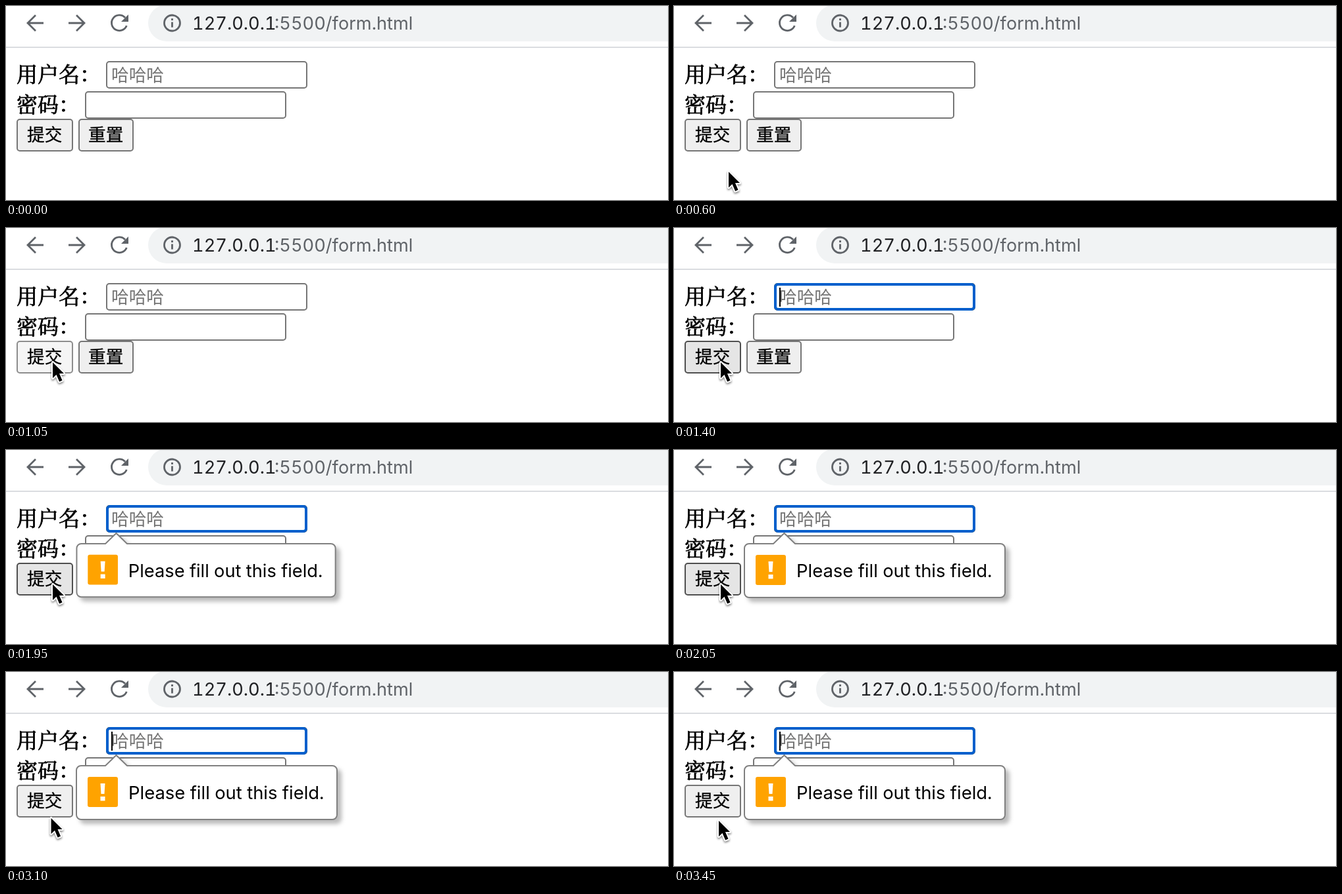
Recreate the animation shown at these times as an HTML page. Size 1006x296 px, loop 3750 ms.

```html
<!DOCTYPE html>
<html lang="zh-CN">
<head>
<meta charset="utf-8">
<title>form</title>
<style>
  html, body { margin: 0; width: 100%; height: 100%; overflow: hidden; background: #fff; }
  svg { display: block; width: 1006px; height: 296px; }
  .ui { font-family: Inter, "Noto Sans", sans-serif; font-variant-numeric: tabular-nums; }
  .label { font: 32px "Noto Serif CJK SC", "Noto Sans CJK SC", serif; stroke: #000; stroke-width: .8; }
  .control { font: 26.67px "Noto Sans CJK SC", "Noto Sans CJK", sans-serif; }
  .icon { fill: none; stroke: #5f6368; stroke-width: 2.8; }
  .field { fill: #fff; stroke: #767676; stroke-width: 2; }
  .button { fill: #efefef; stroke: #767676; stroke-width: 2; }
  .button.hover { fill: #e5e5e5; stroke: #4f4f4f; }
  .button.active { fill: #f5f5f5; stroke: #8d8d8d; }
  .caption { stroke: #000; stroke-width: .3; }
  .bubble { fill: #fff; stroke: #808080; stroke-width: 2; filter: drop-shadow(6px 6px 3px #0004); }
  #cursor { stroke: #fff; stroke-width: 4; stroke-linejoin: round; paint-order: stroke;
            filter: drop-shadow(0 2px 1.5px #0007); }
</style>
</head>
<body>
<svg viewBox="0 0 1006 296">
  <!-- Browser toolbar -->
  <rect x="216" y="-2" width="900" height="56" rx="28" fill="#f1f3f4"/>
  <rect y="62" width="1006" height="2" fill="#dadce0"/>
  <g class="icon">
    <path d="M57 26H33M45 14 33 26 45 38"/>
    <path d="M95 26H119M107 14 119 26 107 38"/>
    <path d="M183.3 30A11.8 11.8 0 1 1 181 17.8"/>
    <path d="M186 13v11h-11z" fill="#5f6368" stroke="none"/>
    <circle cx="252.5" cy="26" r="12"/>
    <path d="M252.5 24.5V32.5M252.5 19V22"/>
  </g>
  <text class="ui" font-size="27.2" y="36" fill="#5f6368"><tspan x="283" fill="#202124">127.0.0.1</tspan><tspan x="408">:5500/form.html</tspan></text>

  <!-- Form -->
  <text class="label" x="16" y="116">用户名：</text>
  <text class="label" x="16" y="162">密码：</text>
  <rect class="field" x="153" y="85" width="304" height="40" rx="4"/>
  <rect class="field" x="121" y="131" width="304" height="40" rx="4"/>
  <text class="control" x="160" y="115" fill="#757575">哈哈哈</text>
  <rect id="focus" x="154" y="86" width="302" height="38" rx="4" fill="none" stroke="#005fcc" stroke-width="4"/>
  <rect id="caret" x="160" y="91" width="2" height="29"/>
  <rect id="submit" class="button" x="17" y="173" width="84" height="48" rx="4"/>
  <rect class="button" x="111" y="173" width="82" height="48" rx="4"/>
  <text class="control caption" x="32" y="206">提交</text>
  <text class="control caption" x="125" y="206">重置</text>

  <!-- Validation message -->
  <g id="message">
    <path class="bubble" d="M114 143H151L167.500 127 184 143H496a7 7 0 0 1 7 7V218a7 7 0 0 1-7 7H114a7 7 0 0 1-7-7V150a7 7 0 0 1 7-7z"/>
    <rect x="124" y="160" width="46" height="46" rx="3" fill="#ffa300"/>
    <path d="M143.500 170h7l-1 16h-5zM143.500 190h7v6.500h-7z" fill="#fff"/>
    <text class="ui" font-size="27.45" x="186" y="194">Please fill out this field.</text>
  </g>

  <path id="cursor" d="M0 0V24l5.500-5.300 4.600 10.800 4.400-1.900-4.500-10.600H17z"/>
</svg>
<script>
const LOOP = 3750, STEP = 50;
const [focusRing, caret, submit, message, cursor] =
  ["focus", "caret", "submit", "message", "cursor"].map(id => document.getElementById(id));

const show = (el, visible) => el.setAttribute("visibility", visible ? "visible" : "hidden");
const within = (t, from, to) => t >= from && t < to;

// Eased position between two points, clamped to the time span.
function glide(t, start, end, from, to) {
  const k = Math.min(1, Math.max(0, (t - start) / (end - start)));
  const eased = k * (2 - k);
  return from.map((v, i) => v + (to[i] - v) * eased);
}

function cursorAt(t) {
  if (t < 600) return [92, 278];
  if (t < 2950) return glide(t, 600, 850, [83, 253], [71, 205]);
  return glide(t, 2900, 3250, [71, 205], [68, 227]);
}

function render(t) {
  const [x, y] = cursorAt(t);
  show(cursor, t >= 200);
  cursor.setAttribute("transform", `translate(${x} ${y})`);

  const state = within(t, 1050, 1400) ? " active" : within(y, 172, 222) ? " hover" : "";
  submit.setAttribute("class", "button" + state);

  show(focusRing, t >= 1400);
  show(caret, within(t, 1400, 1950) || within(t, 2650, 3150) || t >= 3400);

  show(message, t >= 1950);
  const scale = t < 2050 ? 0.993 : 1;
  message.setAttribute("transform", `translate(168 127) scale(${scale}) translate(-168 -127)`);
}

function tick() {
  const t = performance.now() % LOOP;
  render(Math.floor(t / STEP) * STEP);
  requestAnimationFrame(tick);
}
tick();
</script>
</body>
</html>
```
